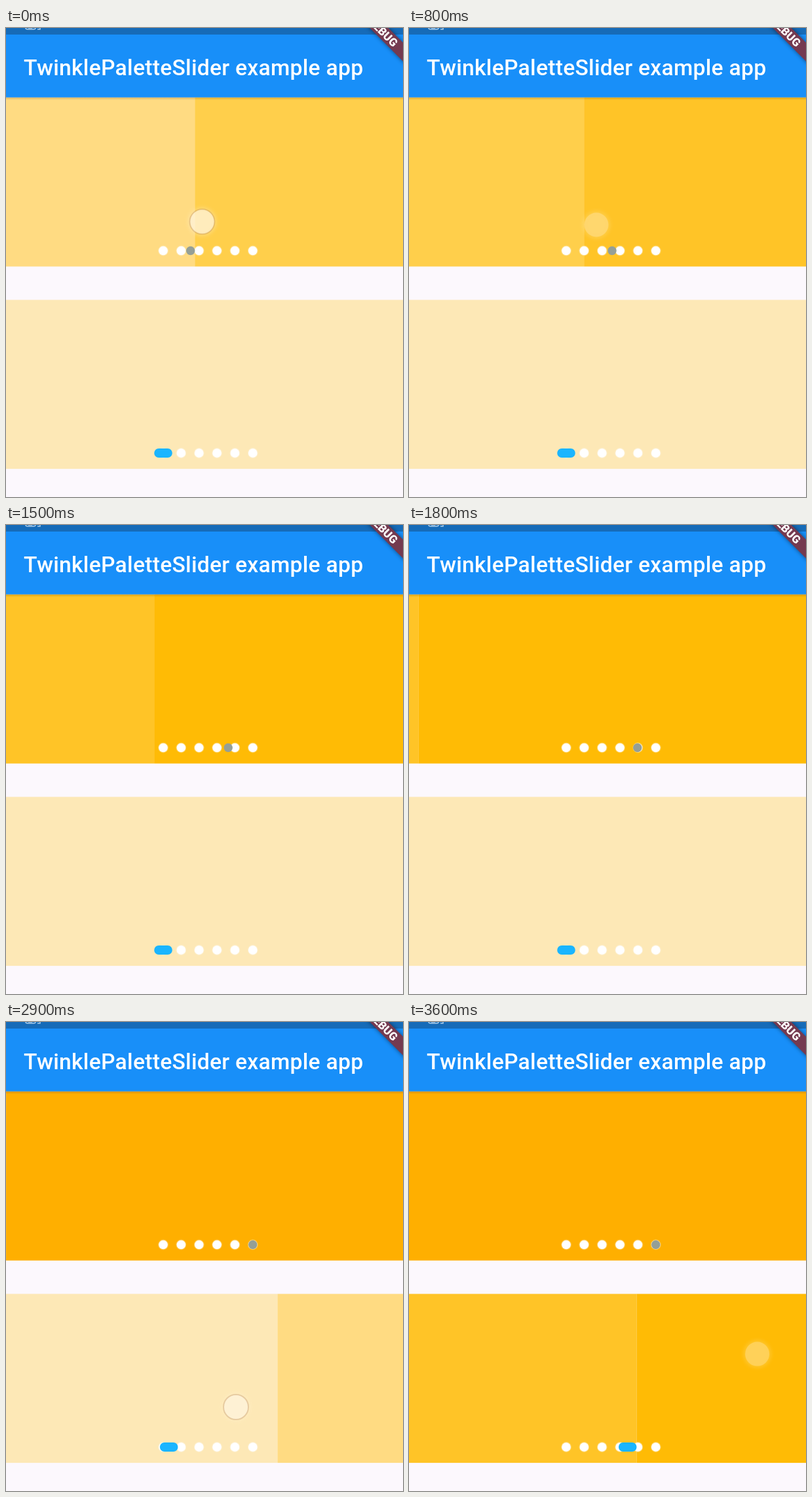
Animation of 606 by 715 pixels, one loop 3.7 s. Source, as an HTML page:

```html
<!DOCTYPE html>
<html lang="en">
<head>
<meta charset="utf-8">
<title>Page indicators</title>
<style>
  html, body { margin: 0; width: 100%; height: 100%; overflow: hidden; background: #fcf8fd; }
  svg { display: block; width: 606px; height: 715px; }
  text { font-family: Roboto, "Noto Sans", sans-serif; fill: #fff; }
  .title { font-size: 33.67px; font-weight: 500; letter-spacing: .25px; }
  .banner { font-size: 17.2px; font-weight: 900; text-anchor: middle; }
</style>
</head>
<body>
<svg viewBox="0 0 606 715">
  <defs>
    <linearGradient id="shade" x2="0" y2="1">
      <stop offset="0" stop-color="#000" stop-opacity=".2"/>
      <stop offset="1" stop-color="#000" stop-opacity="0"/>
    </linearGradient>
    <filter id="soft" x="-50%" y="-50%" width="200%" height="200%">
      <feGaussianBlur stdDeviation="3"/>
    </filter>
  </defs>
  <rect width="606" height="715" fill="#fcf8fd"/>
  <g id="pagers"></g>

  <rect y="105" width="606" height="5" fill="url(#shade)"/>
  <rect width="606" height="105.7" fill="#188ff9"/>
  <rect width="606" height="10" fill="#166bb8"/>
  <path d="M30 0q0 2 3 2h9q3 0 3-2M34 0h6M48 2h4V0" fill="none" stroke="#a9cdec" stroke-width="1.5"/>
  <text class="title" y="71.5"><tspan x="27">TwinklePaletteSlider</tspan><tspan x="350">example app</tspan></text>
  <g transform="translate(575.5 6)rotate(45)">
    <rect x="-67" y="-10" width="134" height="20" fill="#000" opacity=".5" filter="url(#soft)"/>
    <rect x="-67" y="-10" width="134" height="20" fill="#743a50"/>
    <text class="banner" y="6">DEBUG</text>
  </g>
</svg>
<script>
const LOOP = 3700, STEP = 100;
const WIDTH = 606, HEIGHT = 257.6, DOT_X = 240, DOT_GAP = 27.35;
const AMBERS = ['#fde8b6', '#ffdb82', '#ffcf4b', '#ffc427', '#ffbb05', '#ffaf00'];

// Each swipe: start time, pages moved, and where the finger lands.
const SLOW = { tau: 227, power: 1.575 };
const FAST = { tau: 249, power: 2.737 };
const topSwipes = [-188, 600, 1275, 2000].map(
  start => ({ start, pages: 1, x: 510, y: 222, ...SLOW }));
const bottomSwipes = [
  { start: 2800, pages: 4, x: 463, y: 548, ...FAST },
  { start: 3395, pages: -1, x: 302, y: 586, ...SLOW }
];
const swipes = [...topSwipes, ...bottomSwipes];
const TOUCH_TIME = 215, FADE_FROM = 190;

// Slow start under the finger, then a long settle towards 1.
const settle = (age, { tau, power }) => age > 0 ? 1 - Math.exp(-((age / tau) ** power)) : 0;
const pageAt = (list, first, t) =>
  list.reduce((page, s) => page + s.pages * settle(t - s.start, s), first);

function make(parent, tag, attrs = {}) {
  const node = document.createElementNS('http://www.w3.org/2000/svg', tag);
  for (const key in attrs) node.setAttribute(key, attrs[key]);
  return parent.appendChild(node);
}

const move = (node, x, y = 0) => node.setAttribute('transform', `translate(${x} ${y})`);
const root = document.getElementById('pagers');

function makePager(y, dotY, w, h, fill) {
  const strip = make(root, 'g');
  AMBERS.forEach((color, i) => make(strip, 'rect', {
    x: i * WIDTH, y, width: WIDTH, height: HEIGHT, fill: color
  }));
  AMBERS.forEach((_, i) => {
    const spot = { cx: DOT_X + i * DOT_GAP, cy: dotY, fill: '#fff' };
    make(root, 'circle', { ...spot, r: 7.9, opacity: .3 });
    make(root, 'circle', { ...spot, r: 6.8 });
  });
  const mark = make(root, 'rect', {
    x: DOT_X - w / 2, y: dotY - h / 2, width: w, height: h, rx: h / 2, fill
  });
  return page => {
    move(strip, -page * WIDTH);
    move(mark, page * DOT_GAP);
  };
}

const showTop = makePager(106, 339.5, 13.4, 13.4, '#959f96');
const showBottom = makePager(414.5, 648, 27.6, 13.8, '#1ab5ff');

const finger = make(root, 'g');
make(finger, 'circle', { r: 21, fill: '#fff3d2', opacity: .4, filter: 'url(#soft)' });
make(finger, 'circle', { r: 18.5, fill: '#fff6e0', 'fill-opacity': .62 });
const ring = make(finger, 'circle', {
  r: 19, fill: 'none', stroke: '#a0643c', 'stroke-opacity': .24, 'stroke-width': 2
});

function showFinger(t) {
  const swipe = swipes.find(s => t >= s.start && t < s.start + TOUCH_TIME);
  finger.setAttribute('visibility', swipe ? 'visible' : 'hidden');
  if (!swipe) return;
  const age = t - swipe.start, way = Math.sign(swipe.pages), fading = age > FADE_FROM;
  move(finger, swipe.x - way * 1.12 * age, swipe.y + way * .39 * age);
  finger.setAttribute('opacity', fading ? .5 : 1);
  ring.setAttribute('opacity', fading ? 0 : 1);
}

const start = performance.now();
function tick() {
  const elapsed = (performance.now() - start) % LOOP;
  const t = Math.floor(elapsed / STEP) * STEP;
  showTop(pageAt(topSwipes, 1, t));
  showBottom(pageAt(bottomSwipes, 0, t));
  showFinger(t);
  requestAnimationFrame(tick);
}
tick();
</script>
</body>
</html>
```
